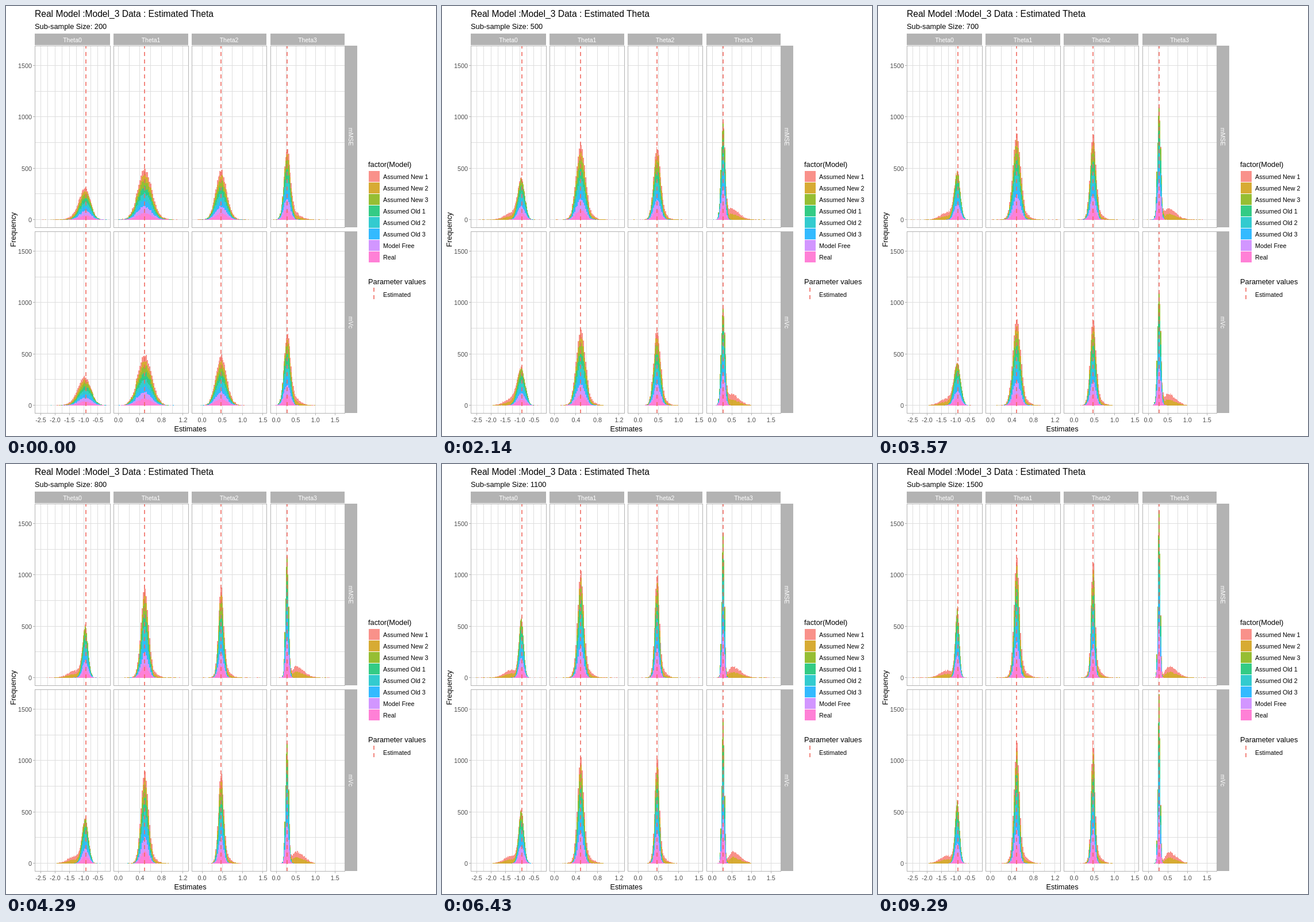
These frames come from a looping animation (748 by 748 pixels, 10 s). An HTML page:

```html
<!DOCTYPE html>
<html lang="en">
<head>
<meta charset="utf-8">
<title>Estimated Theta</title>
<style>
html, body { margin: 0; width: 100%; height: 100%; overflow: hidden; background: #fff; }
svg { display: block; width: 100vw; height: 100vh; font-family: "Liberation Sans", Arial, sans-serif; }
</style>
</head>
<body>
<svg id="chart" viewBox="0 0 748 748"></svg>
<script>
const LOOP = 10000, STEPS = 14, BIN = 0.02, DRAWS = 1000;
const GREY = '#b3b3b3', GRID = '#dedede', DASH = '#f0695f';
const PX = 89.3 / 500;
const models = [
  ['Assumed New 1', '#f8766d'], ['Assumed New 2', '#cd9600'],
  ['Assumed New 3', '#7cae00'], ['Assumed Old 1', '#00be67'],
  ['Assumed Old 2', '#00bfc4'], ['Assumed Old 3', '#00a9ff'],
  ['Model Free', '#c77cff'], ['Real', '#ff61cc']
];

// wide(q): mode, left and right spread of the two "New" models, q = 200 / size
const cols = [
  { x: 50, w: 132, zero: 184.8, unit: 49.7, tick: 0.5, from: -2.5, to: -0.5, line: 139,
    mean: -0.95, sd: [0.195, 0.22], cut: -1.95,
    wide: q => [-1.31 + 0.26 * q ** 1.5, 0.24 + 0.05 * q, 0.18 + 0.02 * q] },
  { x: 187, w: 131, zero: 195.5, unit: 93.7, tick: 0.4, from: 0, to: 1.2, line: 241,
    mean: 0.488, sd: [0.126, 0.125], cut: 0.92,
    wide: q => [0.49, 0.075 + 0.06 * q, 0.125 + 0.035 * q] },
  { x: 323, w: 131, zero: 341, unit: 70.6, tick: 0.5, from: 0, to: 1.5, line: 374,
    mean: 0.47, sd: [0.13, 0.128], cut: 1.05,
    wide: q => [0.47, 0.07 + 0.06 * q, 0.14 + 0.03 * q] },
  { x: 460, w: 130, zero: 470, unit: 68.2, tick: 0.5, from: 0, to: 1.5, line: 489,
    mean: 0.278, sd: [0.081, 0.081], cut: 0.98,
    wide: q => [0.55 - 0.22 * q ** 1.2, 0.095, 0.195] }
];
const rows = [{ y: 69, zero: 372, name: 'mMSE' }, { y: 392, zero: 695, name: 'mVc' }];
const HEIGHT = 317;

const svg = document.getElementById('chart');
function add(tag, attrs, text) {
  const el = document.createElementNS('http://www.w3.org/2000/svg', tag);
  for (const key in attrs) el.setAttribute(key, attrs[key]);
  if (text !== undefined) el.textContent = text;
  return svg.appendChild(el);
}
const rect = (x, y, width, height, fill, more) =>
  add('rect', { x, y, width, height, fill, 'shape-rendering': 'crispEdges', ...more });
const label = (x, y, text, size, fill = '#000', anchor = 'start', turn = 0) =>
  add('text', { x, y, fill, 'font-size': size, 'text-anchor': anchor,
    transform: `rotate(${turn} ${x} ${y})` }, text);
const dashed = (x, bottom, top) => add('path', {
  d: `M${x} ${bottom}V${top}`, stroke: DASH, 'stroke-width': 1.6, 'stroke-dasharray': '7 6'
});

function buildPanel(col, row, r) {
  const bottom = row.y + HEIGHT;
  for (let v = 0; v <= 1500; v += 250)
    rect(col.x, Math.floor(row.zero - 0.5 - v * PX), col.w, 1, GRID);
  for (let v = col.from; v < col.to + col.tick; v += col.tick / 2) {
    const x = Math.floor(col.zero + v * col.unit);
    if (x < col.x + col.w - 1) rect(x, row.y, 1, HEIGHT, GRID);
  }
  const bars = models.map(m => add('path', {
    fill: m[1], 'fill-opacity': 0.8, 'shape-rendering': 'crispEdges'
  }));
  dashed(col.line, bottom, row.y);
  rect(col.x + 0.5, row.y + 0.5, col.w - 1, HEIGHT - 1, 'none', { stroke: GREY });
  return { col, row, r, bars };
}

label(50, 19, 'Real Model :Model_3 Data : Estimated Theta', 15.6);
const subtitle = label(50, 40, '', 12.8);
const panels = rows.flatMap((row, r) => cols.map(col => buildPanel(col, row, r)));

cols.forEach((col, i) => {
  rect(col.x, 48, col.w - 1, 20, GREY);
  label(col.x + col.w / 2 - 0.5, 63, 'Theta' + i, 10.5, '#fff', 'middle');
  for (let v = col.from; v < col.to + 0.01; v += col.tick) {
    const x = col.zero + v * col.unit;
    rect(Math.floor(x), 709, 1, 3, GREY);
    label(x, 723.5, v.toFixed(1), 10.8, '#4d4d4d', 'middle');
  }
});
rows.forEach(row => {
  rect(590, row.y, 21, HEIGHT - 1, GREY);
  label(596, row.y + HEIGHT / 2, row.name, 10.5, '#fff', 'middle', 90);
  for (let v = 0; v <= 1500; v += 500) {
    const y = row.zero - 0.5 - v * PX;
    rect(47, Math.floor(y), 3, 1, GREY);
    label(45, y + 4.3, v, 10.8, '#4d4d4d', 'end');
  }
});
label(320.5, 740, 'Estimates', 12.8, '#000', 'middle');
label(17, 389, 'Frequency', 12.8, '#000', 'middle', -90);

label(630, 279.5, 'factor(Model)', 12.8);
models.forEach(([name, color], i) => {
  rect(631, 287 + 20 * i, 19, 19, color, { 'fill-opacity': 0.8 });
  label(656, 301 + 20 * i, name, 10.8);
});
label(630, 483.5, 'Parameter values', 12.8);
dashed(640, 510, 490);
label(656, 506, 'Estimated', 10.8);

function seeded(seed) {
  return () => {
    seed = (seed + 0x6D2B79F5) | 0;
    let t = Math.imul(seed ^ (seed >>> 15), 1 | seed);
    t = (t + Math.imul(t ^ (t >>> 7), 61 | t)) ^ t;
    return ((t ^ (t >>> 14)) >>> 0) / 4294967296;
  };
}

// Expected count per bin for a bell with separate left and right spread
function expected(v, mode, left, right) {
  const d = v - mode, s = d < 0 ? left : right;
  return DRAWS * BIN * 2 / ((left + right) * Math.sqrt(2 * Math.PI)) * Math.exp(-d * d / (2 * s * s));
}

function drawPanel({ col, row, r, bars }, size) {
  const q = 200 / size, sd = col.sd[r] * Math.sqrt(q);
  const [mode, left, right] = col.wide(q);
  const rand = seeded(size * 31 + r * 977 + col.x);
  const paths = models.map(() => '');
  const first = Math.ceil((col.x + 5 - col.zero) / col.unit / BIN);
  const last = Math.floor((col.x + col.w - 6 - col.zero) / col.unit / BIN);
  for (let b = first; b <= last; b++) {
    const v = b * BIN;
    const x0 = Math.round(col.zero + (v - BIN / 2) * col.unit);
    const x1 = Math.round(col.zero + (v + BIN / 2) * col.unit);
    const outside = r === 1 && (col.cut < 0 ? v < col.cut : v > col.cut);
    let sum = 0, base = 0;
    for (let m = models.length - 1; m >= 0; m--) {
      let mid;
      if (m > 1) mid = expected(v, col.mean, sd, sd);
      else if (outside) mid = 0;
      else {
        mid = expected(v, mode, left, right);
        if (r === 0) mid = 0.96 * mid + 0.04 * expected(v, mode, left * 2, right * 2);
      }
      const noise = (rand() + rand() + rand() - 1.5) * 2;
      sum += Math.max(0, Math.floor(mid + 0.5 * Math.sqrt(mid) * noise + rand()));
      const top = Math.ceil(sum * PX);
      if (top > base) paths[m] += `M${x0} ${row.zero - base}H${x1}V${row.zero - top}H${x0}Z`;
      base = top;
    }
  }
  bars.forEach((bar, m) => bar.setAttribute('d', paths[m]));
}

const starts = Array.from({ length: STEPS }, (_, i) => Math.round(i * LOOP / STEPS / 10) * 10);
let shown = -1;
function update(time) {
  const t = time % LOOP;
  const step = starts.filter(s => s <= t).length - 1;
  if (step === shown) return;
  shown = step;
  const size = 200 + 100 * step;
  subtitle.textContent = 'Sub-sample Size: ' + size;
  panels.forEach(p => drawPanel(p, size));
}

const begin = performance.now();
function frame() {
  update(performance.now() - begin);
  requestAnimationFrame(frame);
}
frame();
</script>
</body>
</html>
```
